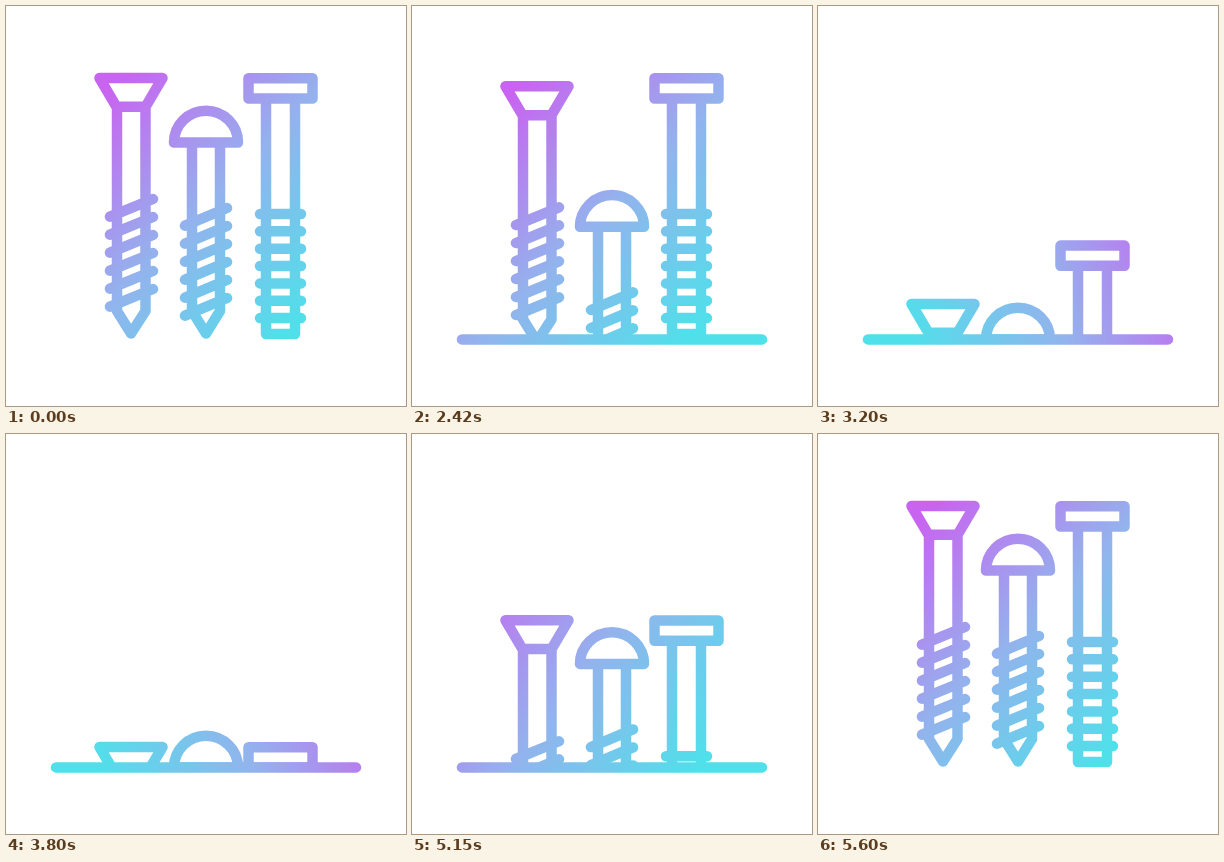
An HTML page with a canvas that plays this animation: 400 by 400 pixels, repeating every 5.66 s.

```html
<!DOCTYPE html>
<html lang="en">
<head>
<meta charset="utf-8">
<title>Screws</title>
<style>
  html, body { margin: 0; height: 100%; overflow: hidden; background: #fff; }
  canvas { display: block; }
</style>
</head>
<body>
<canvas id="stage" width="400" height="400"></canvas>
<script>
const ctx = document.getElementById('stage').getContext('2d');
const LOOP = 5660, GROUND = 333.4, RISE_END = 5600;

// Cubic bezier (.33, 0, .37, 1), solved by bisection
function ease(u) {
  if (u <= 0) return 0;
  if (u >= 1) return 1;
  let lo = 0, hi = 1;
  for (let i = 0; i < 24; i++) {
    const m = (lo + hi) / 2, n = 1 - m;
    if (3 * n * n * m * 0.33 + 3 * n * m * m * 0.37 + m * m * m < u) lo = m; else hi = m;
  }
  return lo * lo * (3 - 2 * lo);
}

// Goes 0 to 1 from `start`, and mirrors that back to 0 at RISE_END
const thereAndBack = (t, start, span) =>
  Math.min(ease((t - start) / span), ease((RISE_END - t) / span));

function threads(x1, x2, y, step, slant, count) {
  let d = '';
  for (let i = 0; i < count; i++) d += `M${x1} ${y + slant + i * step}L${x2} ${y + i * step}`;
  return d;
}

const parts = [
  { start: 2300, depth: 241, path: new Path2D(
    'M93.5 72H156.5L139.5 100.8H110.5ZM111 101V305L125 327.5L139.5 305V101' +
    threads(104, 147, 193, 18, 17.7, 6)) },
  { start: 2000, depth: 197, path: new Path2D(
    'M168 136.5A32 31.7 0 0 1 232 136.5ZM186 136.5V305L200 327.5L214 305V136.5' +
    threads(179, 221, 202, 18, 17.7, 6)) },
  { start: 2600, depth: 241, path: new Path2D(
    'M242.5 72.3H306.5V92.5H242.5ZM260 92.5V328H289V92.5' +
    threads(254, 295, 208, 17.35, 0, 7)) }
];

function gradientAngle(t) {
  if (t < 4100) return 45 + 115 * ease((t - 2480) / 720);
  return 20 + 25 * ease((t - 4700) / 900);
}

function gradient(t) {
  const a = gradientAngle(t) * Math.PI / 180;
  const dx = 150 * Math.cos(a), dy = 150 * Math.sin(a);
  const g = ctx.createLinearGradient(200 - dx, 200 - dy, 200 + dx, 200 + dy);
  g.addColorStop(0, '#c864f0');
  g.addColorStop(0.5, '#93b3ed');
  g.addColorStop(1, '#4fe0ea');
  return g;
}

function draw(t) {
  ctx.fillStyle = '#fff';
  ctx.fillRect(0, 0, 400, 400);
  ctx.lineWidth = 10.5;
  ctx.lineCap = ctx.lineJoin = 'round';
  const paint = gradient(t);

  ctx.save();
  ctx.beginPath();
  ctx.rect(0, 0, 400, GROUND);
  ctx.clip();
  for (const { start, depth, path } of parts) {
    const y = depth * thereAndBack(t, start, 1200);
    // Shift the path only, so the gradient stays fixed to the stage
    const moved = new Path2D();
    moved.addPath(path, new DOMMatrix([1, 0, 0, 1, 0, y]));
    ctx.strokeStyle = paint;
    ctx.stroke(moved);
  }
  ctx.restore();

  const half = 150 * thereAndBack(t, 2000, 300);
  if (half > 0) {
    ctx.strokeStyle = paint;
    ctx.beginPath();
    ctx.moveTo(200 - half, GROUND);
    ctx.lineTo(200 + half, GROUND);
    ctx.stroke();
  }
}

const begin = performance.now();
function tick() {
  draw((performance.now() - begin) % LOOP);
  requestAnimationFrame(tick);
}
tick();
</script>
</body>
</html>
```
